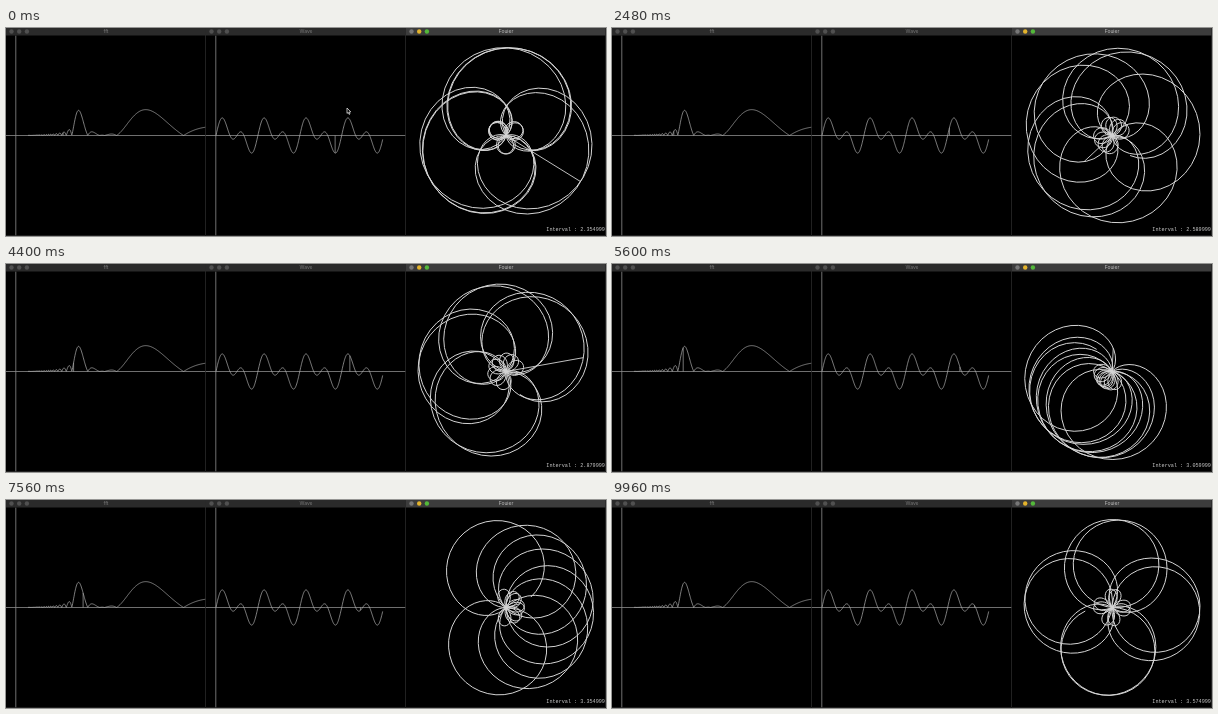
These frames come from a looping animation (600 px wide and 208 px high, 10000 ms). An HTML page with a canvas:

```html
<!DOCTYPE html>
<html>
<head>
<meta charset="utf-8">
<style>
  html, body { margin: 0; overflow: hidden; background: #000; }
  canvas { display: block; }
</style>
</head>
<body>
<canvas id="stage" width="600" height="208"></canvas>
<script>
const ctx = document.getElementById('stage').getContext('2d');
const TAU = Math.PI * 2, SAMPLES = 500, AXIS_Y = 107.5, BAR = 7.5, LOOP = 10000;

// All three windows are plotted at a third of their logical size.
const signal = i => Math.sin(i / 20) + Math.sin(i / 10);
const waveX = i => 210 + i / 3;
const waveY = i => AXIS_Y - 10 * signal(i);
const fftX = interval => 10 + 20 * interval;

function wind(i, interval) {
  const r = 50 * signal(i), a = TAU * i / 20 / interval;
  return [r * Math.cos(a), r * Math.sin(a)];
}

// Height of the spectrum: distance of the wound curve's mean from the centre.
function fftY(interval) {
  let sx = 0, sy = 0;
  for (let i = 0; i < SAMPLES; i++) {
    const [x, y] = wind(i, interval);
    sx += x;
    sy += y;
  }
  return AXIS_Y - Math.hypot(sx, sy) / SAMPLES;
}

function polyline(points, width, color) {
  ctx.beginPath();
  for (const [x, y] of points) ctx.lineTo(x, y);
  ctx.lineWidth = width;
  ctx.strokeStyle = color;
  ctx.stroke();
}

function text(str, x, y, font, color, align) {
  ctx.font = font;
  ctx.fillStyle = color;
  ctx.textAlign = align;
  ctx.fillText(str, x, y);
}

const range = (n, f) => Array.from({ length: n }, (_, i) => f(i));
const wave = range(SAMPLES + 1, i => [waveX(i), waveY(i)]);
const spectrum = range(535, i => {
  const interval = 0.6 + i / 60;
  return [fftX(interval), fftY(interval)];
});

function windowFrame(x, title, active) {
  ctx.fillStyle = active ? '#3c3c3c' : '#2a2a2a';
  ctx.fillRect(x, 0, 200, BAR);
  polyline([[x + 199.5, 0], [x + 199.5, 207.5], [x, 207.5]], 0.8, '#2a2a2a');
  const lights = active ? ['#777', '#e3b32c', '#53b83a'] : ['#505050', '#505050', '#505050'];
  lights.forEach((color, i) => {
    ctx.beginPath();
    ctx.arc(x + 5.5 + 7.7 * i, 3.5, 2.2, 0, TAU);
    ctx.fillStyle = color;
    ctx.fill();
  });
  text(title, x + 100, 5.4, '5px Inter, sans-serif', active ? '#c4c4c4' : '#777', 'center');
}

function cursor(x, y) {
  ctx.beginPath();
  for (const [dx, dy] of [[0, 0], [0, 5.4], [1.2, 4.3], [2.1, 6.4], [3, 6], [2.1, 4], [3.8, 3.9]])
    ctx.lineTo(x + dx, y + dy);
  ctx.closePath();
  ctx.fillStyle = '#000';
  ctx.fill();
  ctx.lineWidth = 0.8;
  ctx.strokeStyle = '#ddd';
  ctx.stroke();
}

function draw(time) {
  const t = Math.floor(time % LOOP / 40) * 0.04;
  // The interval is stepped by a held key, 30 times a second.
  const steps = Math.min(244, Math.max(0, Math.floor(30 * (t - 0.885))));
  const interval = 2.355 + 0.005 * steps;
  const index = 357.4 + 10.04 * t;

  ctx.fillStyle = '#000';
  ctx.fillRect(0, 0, 600, 208);

  polyline([[0, AXIS_Y], [400, AXIS_Y]], 0.8, '#8c8c8c');
  for (const x of [9.8, 209.8]) polyline([[x, BAR], [x, 208]], 0.8, '#8c8c8c');
  polyline(spectrum, 0.7, '#b4b4b4');
  polyline(wave, 0.7, '#b4b4b4');
  polyline([[fftX(interval), AXIS_Y], [fftX(interval), fftY(interval)]], 0.7, '#aaa');
  polyline([[waveX(index), AXIS_Y], [waveX(index), waveY(index)]], 0.7, '#aaa');

  ctx.save();
  ctx.translate(500, AXIS_Y);
  polyline(range(SAMPLES, i => wind(i, interval)), 1, '#d4d4d4');
  polyline([[0, 0], wind(index, interval)], 0.9, '#d4d4d4');
  ctx.restore();

  text('Interval : ' + (interval - 1e-6).toFixed(6), 540.3, 203,
    '5.15px "Liberation Mono", monospace', '#ccc', 'left');

  windowFrame(0, 'fft', false);
  windowFrame(200, 'Wave', false);
  windowFrame(400, 'Fouier', true);

  if (t < 0.7) cursor(341, 80);
}

function tick() {
  draw(performance.now());
  requestAnimationFrame(tick);
}
tick();
</script>
</body>
</html>
```
